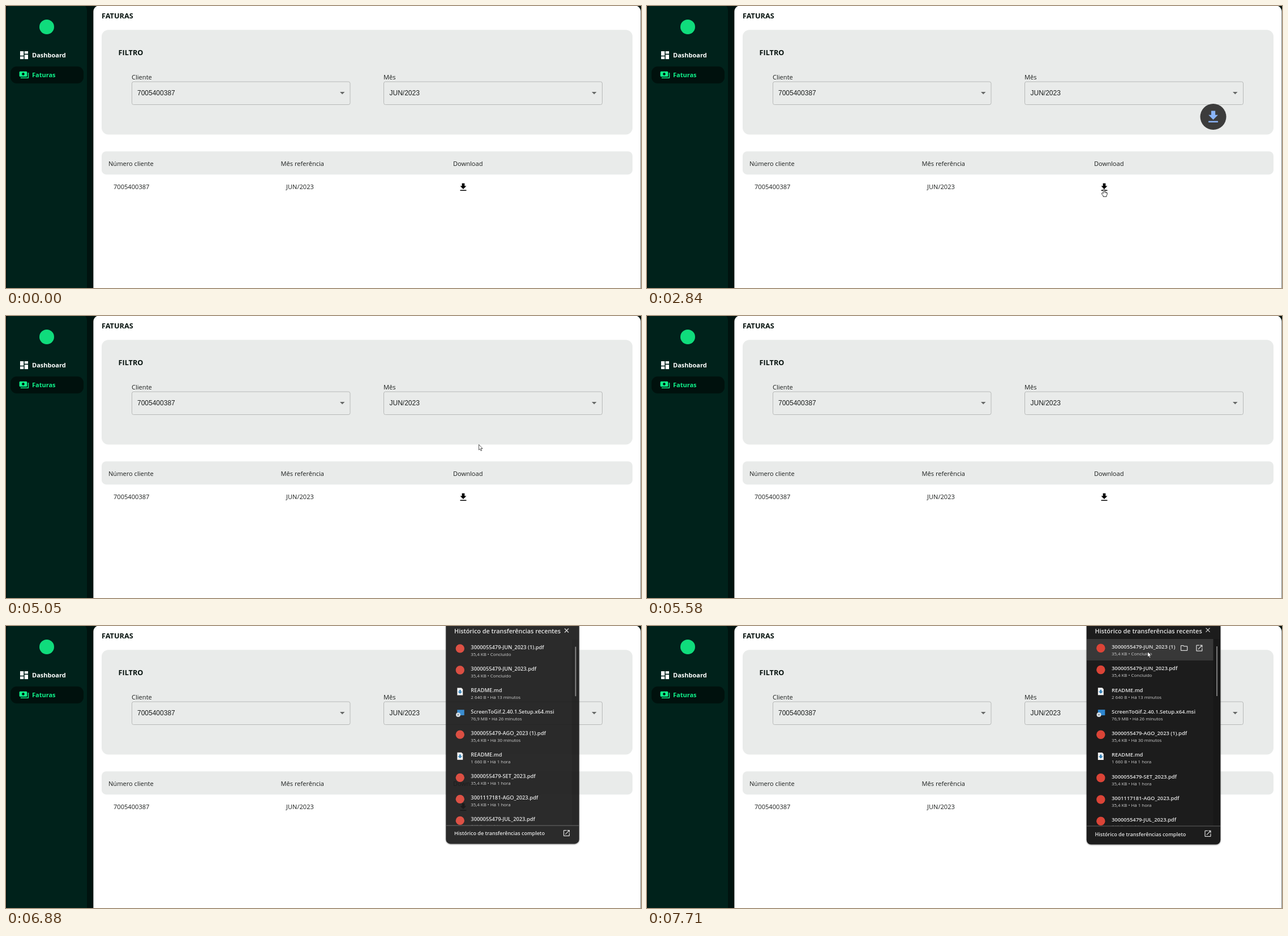
An HTML page that plays this animation: 1122x499 px, repeating every 8 s.

```html
<!DOCTYPE html>
<html lang="pt-BR">
<head>
<meta charset="utf-8">
<title>Faturas</title>
<style>
  html, body { margin: 0; width: 100%; height: 100%; overflow: hidden; background: #00130f; }
  svg { display: block; width: 100%; height: 100%; }
  text { font: 11.1px "Open Sans", "Noto Sans", sans-serif; fill: #1c1f1e; white-space: pre; }
  text.nav { font-size: 11px; font-weight: 700; fill: #fff; }
  text.head { font-size: 12.7px; font-weight: 700; fill: #07130f; }
  text.field { font: 12px "Liberation Sans", Arial, sans-serif; }
  #panel text { font-size: 9.35px; font-weight: 600; fill: #e6e6e6; }
  #panel text.title { font-size: 10.9px; }
  #panel text.foot { font-size: 9.05px; }
  #panel text.info { font-size: 7.9px; font-weight: 400; fill: #cfcfcf; }
</style>
</head>
<body>
<svg viewBox="0 0 1122 499" preserveAspectRatio="none">
  <defs>
    <path id="download" d="M19 9h-4V3H9v6H5l7 7 7-7zM5 18v2h14v-2z"/>
    <path id="open" d="M19 19H5V5h7V3H5a2 2 0 0 0-2 2v14c0 1.1.9 2 2 2h14c1.1 0 2-.9 2-2v-7h-2zM14 3v2h3.6l-9.8 9.8 1.4 1.4L19 6.4V10h2V3z"/>
    <path id="folder" d="M9.2 6l2 2H20v10H4V6h5.2M10 4H4a2 2 0 0 0-2 2v12c0 1.1.9 2 2 2h16c1.1 0 2-.9 2-2V8c0-1.1-.9-2-2-2h-8z"/>
    <circle id="app" r="7.7" fill="#db4437"/>
    <g id="file">
      <path d="M-5-6.5H2.5L5-4V6.5H-5z" fill="#f4f4f4"/>
      <path d="M-1.5-3h3v3H4L0 4-4 0h2.5z" fill="#2f7fb8"/>
    </g>
    <g id="setup">
      <path d="M-5-6H7.5V4H-5z" fill="#2e86cf"/>
      <circle cx="-3.3" cy="3" r="4" fill="#d5dde3"/>
      <circle cx="-3.3" cy="3" r="1.3" fill="#6e7d88"/>
    </g>
    <clipPath id="list"><path d="M777 0h236v353.5H777z"/></clipPath>
    <clipPath id="short"><path d="M777 0h156.5v70H777z"/></clipPath>
    <filter id="shadow" x="-10%" y="-10%" width="120%" height="120%">
      <feDropShadow dx="0" dy=".8" stdDeviation="1.2" flood-opacity=".5"/>
    </filter>
  </defs>

  <rect width="1122" height="499" fill="#00130f"/>
  <rect x="1.5" y="-3" width="141.500" height="515" rx="10" fill="#00221b"/>
  <circle cx="72" cy="37" r="13" fill="#0fdc7c"/>
  <path transform="translate(22.6 77.6) scale(.78)" fill="#fff" d="M3 13h8V3H3zm0 8h8v-6H3zm10 0h8V11h-8zm0-18v6h8V3z"/>
  <text class="nav" x="46" y="91">Dashboard</text>
  <rect x="8" y="107" width="129" height="30" rx="11" fill="#00110d"/>
  <path transform="translate(22.8 112.8) scale(.76)" fill="#10f08a" d="M19 14V6a2 2 0 0 0-2-2H3a2 2 0 0 0-2 2v8c0 1.1.9 2 2 2h14a2 2 0 0 0 2-2zm-9-1a3 3 0 1 1 0-6 3 3 0 0 1 0 6zm13-6v11a2 2 0 0 1-2 2H4v-2h17V7z"/>
  <text class="nav" x="46" y="126.3" style="fill:#10f08a">Faturas</text>

  <rect x="154.4" y="-1" width="967.1" height="520" rx="11" fill="#fff"/>
  <text class="head" x="169" y="22">FATURAS</text>
  <g fill="#e9ebea">
    <rect x="169" y="42.3" width="938" height="185.200" rx="12"/>
    <rect x="169" y="257.2" width="938" height="41" rx="8"/>
  </g>
  <text class="head" x="198.5" y="87">FILTRO</text>
  <text x="222" y="129.5">Cliente</text>
  <text x="667" y="129.5">Mês</text>
  <g fill="none" stroke="#b7b9b8">
    <rect x="222.5" y="134" width="385.5" height="40.5" rx="3"/>
    <rect x="667.5" y="134" width="386" height="40.5" rx="3"/>
  </g>
  <path d="M590 152h8.5l-4.25 4.3zM1035 152h8.5l-4.25 4.3z" fill="#666867"/>
  <text class="field" x="232" y="158.3">7005400387</text>
  <text class="field" x="677.5" y="158.3">JUN/2023</text>
  <text x="181" y="282.5">Número cliente</text>
  <text x="485.5" y="282.5">Mês referência</text>
  <text x="790" y="282.5">Download</text>
  <text x="190" y="323.7">7005400387</text>
  <text x="495" y="323.7">JUN/2023</text>
  <use href="#download" transform="translate(798.6 311.4) scale(.78)"/>

  <g id="flyer">
    <circle r="23" fill="#3c3c3c"/>
    <use href="#download" transform="translate(-14.4 -14) scale(1.2)" fill="#8ab4f8"/>
  </g>

  <g id="panel">
    <rect x="776.7" y="-20" width="236.6" height="406.5" rx="8" fill="#1f1f1f" filter="url(#shadow)"/>
    <rect id="hoverRow" x="777" y="23" width="223.5" height="38" fill="#383838"/>
    <path d="M1000.5 23h12v331h-12z" fill-opacity=".15"/>
    <text class="title" x="791.5" y="12.7">Histórico de transferências recentes</text>
    <path d="M987.5 3.7l7 7m0-7l-7 7" stroke="#d8d8d8" stroke-width="1.2"/>
    <g id="rows" clip-path="url(#list)"></g>
    <g id="hoverIcons" fill="#d8d8d8">
      <use href="#folder" transform="translate(941.6 31.6) scale(.62)"/>
      <use href="#open" transform="translate(968.4 31.7) scale(.62)"/>
    </g>
    <path d="M1007 36v88" stroke="#858585" stroke-width="1.8"/>
    <path d="M777 354h236" stroke="#606060"/>
    <text class="foot" x="791.5" y="371.5">Histórico de transferências completo</text>
    <use href="#open" transform="translate(983.5 360) scale(.62)" fill="#d8d8d8"/>
  </g>

  <circle id="click" cx="807" cy="324" r="9" fill="#ff0" fill-opacity=".47"/>
  <g id="cursor" fill="#fff" stroke="#111" stroke-linejoin="round">
    <path id="arrow" stroke-width=".7" d="M.3.5V10l2.1-1.900 1.5 3.500 1.6-.7L4 7.500h2.900z"/>
    <g id="hand" stroke-width=".9">
      <path d="M-1.3 8V1.2Q-1.2.2-.1.2T1.1 1.2V5l1.5.2.3.6 1.3.1.3.6 1.1.5V10l-1.2 2.2v1.6H-1.5v-1.4L-4.1 9Q-4.6 7.4-3 7.3z"/>
      <path d="M1.1 5v2.5M2.9 5.8v2M4.5 6.5v1.6" fill="none" stroke-width=".6"/>
    </g>
  </g>
</svg>
<script>
const LOOP = 8000;
const el = id => document.getElementById(id);
const show = (id, on) => el(id).setAttribute('visibility', on ? 'visible' : 'hidden');

const files = [
  ['app', '3000055479-JUN_2023 (1).pdf', '35,4 KB • Concluído'],
  ['app', '3000055479-JUN_2023.pdf', '35,4 KB • Concluído'],
  ['file', 'README.md', '2 640 B • Há 13 minutos'],
  ['setup', 'ScreenToGif.2.40.1.Setup.x64.msi', '76,9 MB • Há 26 minutos'],
  ['app', '3000055479-AGO_2023 (1).pdf', '35,4 KB • Há 30 minutos'],
  ['file', 'README.md', '1 660 B • Há 1 hora'],
  ['app', '3000055479-SET_2023.pdf', '35,4 KB • Há 1 hora'],
  ['app', '3001117181-AGO_2023.pdf', '35,4 KB • Há 1 hora'],
  ['app', '3000055479-JUL_2023.pdf', '748 B • Há 1 hora']
];
el('rows').innerHTML = files.map(([icon, name, info], i) => `
  <g transform="translate(0 ${i * 38.25})">
    <use href="#${icon}" x="801.8" y="39.3"/>
    <g><text x="821" y="40">${name}</text></g>
    <text class="info" x="821" y="52">${info}</text>
  </g>`).join('');
const firstName = el('rows').querySelector('g > g');

// lead 1: the first step has already left the starting point
const moves = [
  { at: 520, steps: 10, lead: 0, from: [1063, 492], to: [855, 343], power: 1.8 },
  { at: 1530, steps: 7, lead: 1, from: [855, 343], to: [807.5, 323.5], power: 1.25 },
  { at: 5050, steps: 3, lead: 1, from: [807.5, 323.5], to: [875, 88], power: 1.3 },
  { at: 5440, steps: 3, lead: 1, from: [875, 88], to: [980, -14], power: 1 },
  { at: 7160, steps: 9, lead: 0, from: [974, 2], to: [881, 46.5], power: 1.6 }
];
const STEP = 69;

function cursorAt(t) {
  const move = moves.filter(m => m.at <= t).pop();
  if (!move) return null;
  const { at, steps, lead, from, to, power } = move;
  const k = Math.min(Math.floor((t - at) / STEP), steps - 1);
  const p = 1 - (1 - (k + lead) / (steps - 1 + lead)) ** power;
  return from.map((v, i) => v + (to[i] - v) * p);
}

function drawCursor(t) {
  const pos = cursorAt(t);
  const visible = pos !== null && pos[1] > -12;
  const overButton = visible && Math.hypot(pos[0] - 808, pos[1] - 320) < 20;
  show('arrow', visible && !overButton);
  show('hand', overButton);
  if (visible) el('cursor').setAttribute('transform', `translate(${pos})`);
  return pos;
}

function drawFlyer(t) {
  const k = Math.floor((t - 2790) / 65);
  const on = k >= 0 && k < 6;
  show('flyer', on);
  if (!on) return;
  const p = k / 6;
  el('flyer').setAttribute('transform', `translate(1000.5 ${196 - 218 * p})`);
  el('flyer').setAttribute('opacity', 1 - p * p);
}

function drawPanel(t, pos) {
  const open = t >= 6810;
  const [scale, opacity] = t < 6880 ? [.979, .6] : t < 6950 ? [.995, .93] : [1, 1];
  const hovered = t >= 7160 && pos[1] > 22;
  el('panel').setAttribute('opacity', opacity);
  el('panel').setAttribute('transform',
    `translate(895 170) scale(${scale}) translate(-895 -170)`);
  show('panel', open);
  show('hoverRow', open && hovered);
  show('hoverIcons', open && hovered);
  if (hovered) firstName.setAttribute('clip-path', 'url(#short)');
  else firstName.removeAttribute('clip-path');
}

function render() {
  const t = performance.now() % LOOP;
  const pos = drawCursor(t);
  show('click', t >= 2280 && t < 2570);
  drawFlyer(t);
  drawPanel(t, pos);
  requestAnimationFrame(render);
}
render();
</script>
</body>
</html>
```
